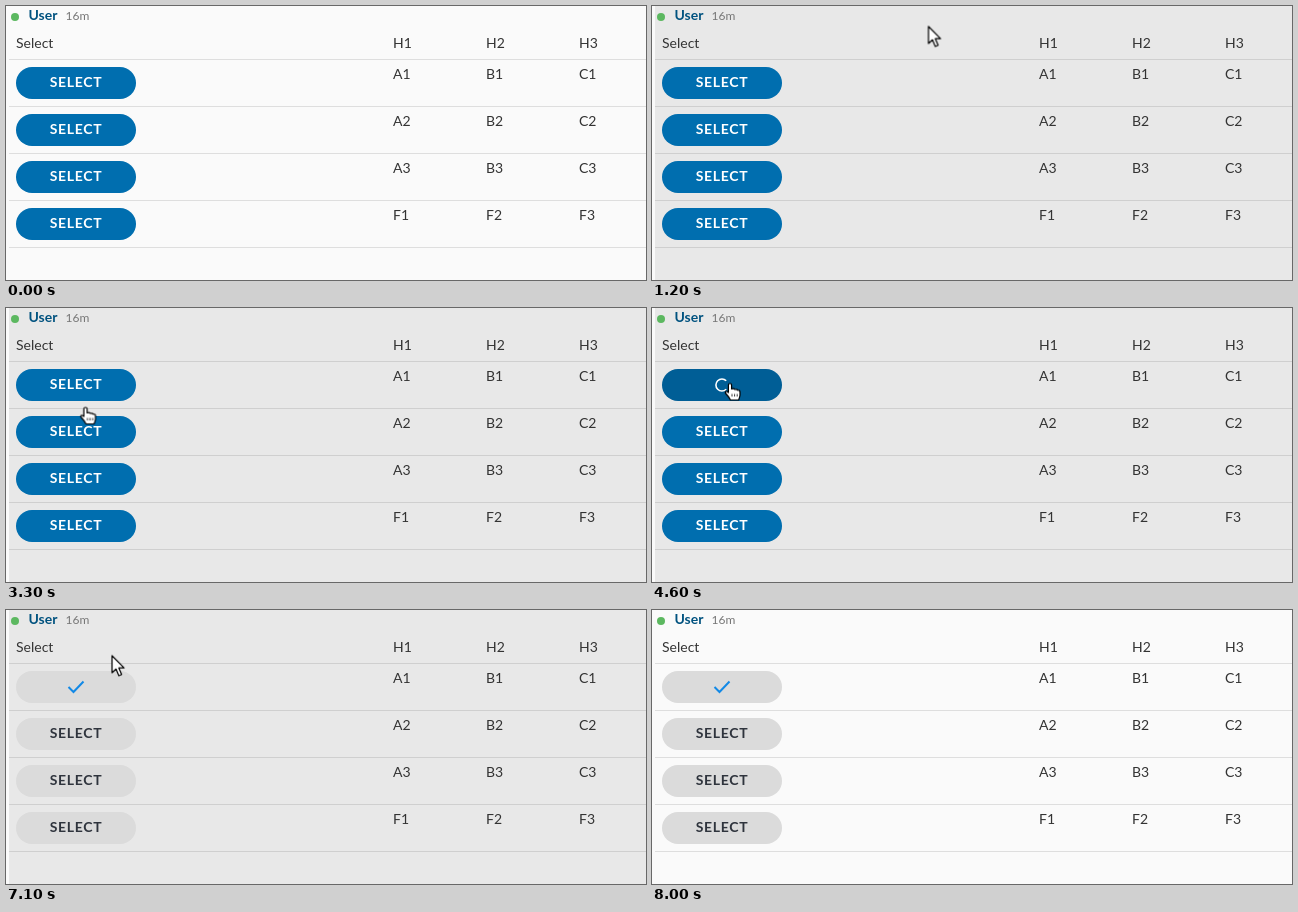
These frames come from a looping animation (640x274 px, 9.4 s). An HTML page:

```html
<!DOCTYPE html>
<html lang="en">
<head>
<meta charset="utf-8">
<title>Select table</title>
<style>
  :root { --blue: #006eaf; --dark: #005e96; --gray: #dbdbdb; }
  html, body { margin: 0; width: 100%; height: 100%; overflow: hidden; background: #fafafa; }
  svg { display: block; width: 640px; height: 274px; }
  text { font: 14px Lato, sans-serif; fill: #333; }

  .user { font-weight: 700; fill: #00527f; }
  .time { font-size: 12px; fill: #777; }
  .lines { stroke: rgb(61 60 64 / .15); }
  .label { font-weight: 700; letter-spacing: .7px; text-anchor: middle; }

  .hover, .btn, .label, .spinner, .check, .arrow, .hand { animation: 9.4s step-end infinite; }
  .hover { animation-name: hover; }
  .b1 { animation-name: b1; }
  .b2 { animation-name: b2; }
  .b3 { animation-name: b3; }
  .b4 { animation-name: b4; }
  .label { animation-name: label; }
  .first { animation-name: first; }
  .spinner { animation-name: loading; }
  .check { animation-name: done; }
  .arrow { animation-name: arrow; }
  .hand { animation-name: hand; }
  .arc { animation: spin 9.4s infinite; transform-origin: 70px 77px; }
  .cursor { animation: move 9.4s infinite; }
  .cursor path { stroke: #000; stroke-width: 1.2; stroke-linejoin: round; fill: #fff; }

  @keyframes hover { 0%, 85.106% { fill: #fafafa } 10.638% { fill: #e8e8e8 } }

  @keyframes b1 { 0% { fill: var(--blue) } 36.17% { fill: var(--dark) } 69.148%, to { fill: var(--gray) } }
  @keyframes b2 { 0%, 35.106% { fill: var(--blue) } 31.914% { fill: var(--dark) } 69.148%, to { fill: var(--gray) } }
  @keyframes b3 { 0%, 30.851% { fill: var(--blue) } 28.723% { fill: var(--dark) } 69.148%, to { fill: var(--gray) } }
  @keyframes b4 { 0%, 27.659% { fill: var(--blue) } 24.468% { fill: var(--dark) } 69.148%, to { fill: var(--gray) } }

  @keyframes label { 0% { fill: #fff } 69.148%, to { fill: #2f343d } }
  @keyframes first { 0% { fill: #fff } 48.936%, to { fill: transparent } }
  @keyframes loading { 0%, 69.148%, to { opacity: 0 } 48.936% { opacity: 1 } }
  @keyframes done { 0% { opacity: 0 } 69.148%, to { opacity: 1 } }
  @keyframes arrow { 0%, 69.148%, to { opacity: 1 } 24.468% { opacity: 0 } }
  @keyframes hand { 0%, 69.148%, to { opacity: 0 } 24.468% { opacity: 1 } }

  @keyframes spin {
    0%, 48.936% { transform: rotate(0deg); animation-timing-function: steps(19) }
    69.148%, to { transform: rotate(684deg) }
  }

  /* The pointer advances ten times a second */
  @keyframes move {
    0% { transform: translate(-40px, -40px); animation-timing-function: step-end }
    10.638% { transform: translate(281px, -4px); animation-timing-function: steps(2) }
    12.765% { transform: translate(276.5px, 20.5px); animation-timing-function: steps(7) }
    20.212% { transform: translate(221px, 178.5px); animation-timing-function: steps(5) }
    25.531% { transform: translate(80px, 214px); animation-timing-function: step-end }
    27.659% { transform: translate(79.5px, 179.5px); animation-timing-function: steps(9) }
    37.234% { transform: translate(79.5px, 76.5px); animation-timing-function: step-end }
    40.425% { transform: translate(78px, 75.5px); animation-timing-function: step-end }
    69.148% { transform: translate(76.5px, 76.5px); animation-timing-function: step-end }
    72.34% { transform: translate(76.5px, 76.5px); animation-timing-function: steps(10) }
    82.978%, to { transform: translate(175px, -26px) }
  }
</style>
</head>
<body>
<svg viewBox="0 0 640 274">
  <rect class="hover" x="3" width="637" height="274" fill="#fafafa"/>
  <circle cx="9" cy="11" r="4" fill="#5cb860"/>
  <text class="user" x="22.5" y="14">User</text>
  <text class="time" x="59.5" y="14">16m</text>

  <path class="lines" d="M3 53.5H640M3 100.5H640M3 147.5H640M3 194.5H640M3 241.5H640"/>

  <text x="10" y="42">Select</text>
  <text y="42"><tspan x="387">H1</tspan><tspan x="480">H2</tspan><tspan x="573">H3</tspan></text>
  <text y="73"><tspan x="387">A1</tspan><tspan x="480">B1</tspan><tspan x="573">C1</tspan></text>
  <text y="120"><tspan x="387">A2</tspan><tspan x="480">B2</tspan><tspan x="573">C2</tspan></text>
  <text y="167"><tspan x="387">A3</tspan><tspan x="480">B3</tspan><tspan x="573">C3</tspan></text>
  <text y="214"><tspan x="387">F1</tspan><tspan x="480">F2</tspan><tspan x="573">F3</tspan></text>

  <rect class="btn b1" x="10" y="61" width="120" height="32" rx="16"/>
  <rect class="btn b2" x="10" y="108" width="120" height="32" rx="16"/>
  <rect class="btn b3" x="10" y="155" width="120" height="32" rx="16"/>
  <rect class="btn b4" x="10" y="202" width="120" height="32" rx="16"/>
  <text class="label first" x="70" y="81">SELECT</text>
  <text class="label" x="70" y="128">SELECT</text>
  <text class="label" x="70" y="175">SELECT</text>
  <text class="label" x="70" y="222">SELECT</text>

  <g class="spinner" fill="none" stroke="#fff" stroke-width="1.6">
    <path class="arc" d="M74.2 81.2A6 6 0 1 1 74.2 72.8"/>
  </g>
  <path class="check" d="M62.5 77L67.5 82L77.5 71.5" fill="none" stroke="#1289e6" stroke-width="2"/>

  <g class="cursor">
    <path class="arrow" d="M0 0V17L4 13.3L6.8 20L9.6 18.8L6.8 12.2H12Z"/>
    <g class="hand">
      <path d="M-1.6 9V1.5Q-1.6 0 0 0T1.6 1.5V5.5Q4 4.6 4.8 6Q7 5.4 7.8 6.8Q10 6.4 10 8.6V12Q9.6 14 8.6 16.5H.5Q-1 13.5-4.6 9.5Q-5 7.6-3.2 8Z"/>
      <path d="M2 10.5V13M4.6 10.5V13M7.2 10.5V13" style="stroke-width:.8"/>
    </g>
  </g>
</svg>
</body>
</html>
```
